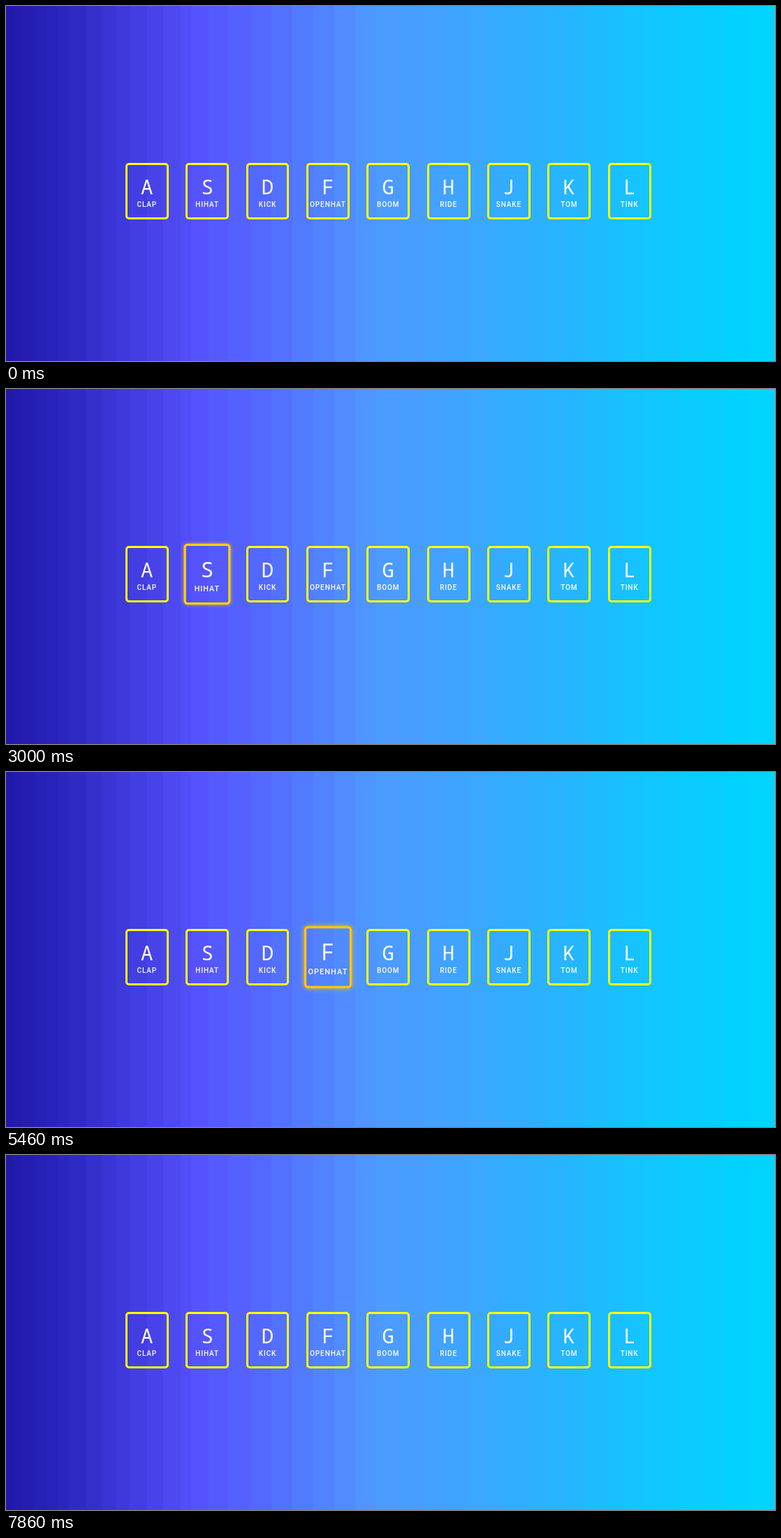
Recreate the animation shown at these times as an HTML page. Size 1101 by 509 pixels, loop 9200 ms.

```html
<!DOCTYPE html>
<html lang="en">
<head>
<meta charset="utf-8">
<title>Drum keys</title>
<style>
html, body { margin: 0; width: 100%; height: 100%; overflow: hidden; }
#stage { position: relative; width: 1101px; height: 509px; overflow: hidden; }
.key {
  position: absolute; top: 225px; width: 61.87px; height: 81px;
  box-sizing: border-box; border: 3px solid #ff0; border-radius: 5px;
  color: #fff; text-align: center;
}
.key kbd, .key span { position: absolute; left: -10px; right: -10px; white-space: nowrap; }
.key kbd { top: 16px; font: 29px/30px "Noto Sans Mono", monospace; }
.key span { top: 50.5px; font: 500 10px/12px Roboto, sans-serif; letter-spacing: .9px; }
#pointer { position: absolute; left: 0; top: 0; }
</style>
</head>
<body>
<div id="stage">
  <svg id="pointer" width="13" height="20"><path d="M.5 .5V16.5L4.3 13L7 19L9.5 18L6.8 12H12Z" fill="#fff" stroke="#000"/></svg>
</div>
<script>
const LOOP = 9200, RISE = 70;
const stage = document.getElementById('stage');
const pointer = document.getElementById('pointer');
const mix = (a, b, p) => a + (b - a) * p;
const clamp = v => Math.max(0, Math.min(1, v));

// Background: a smooth ramp sampled once per vertical band
const ramp = [
  [0, 32, 24, 170], [100, 47, 41, 196], [200, 68, 64, 228], [280, 86, 84, 255],
  [380, 83, 108, 255], [530, 78, 154, 255], [640, 64, 163, 255], [800, 38, 181, 255],
  [950, 14, 201, 255], [1060, 0, 211, 255], [1101, 0, 212, 255]
];
const edges = [0, 10, 22, 40, 58, 74, 90, 115, 138, 158, 177, 202, 225, 250, 265, 290, 318,
  350, 380, 410, 440, 470, 500, 530, 565, 600, 630, 660, 685, 712, 750, 775, 800, 830,
  860, 885, 910, 940, 965, 1000, 1030, 1060, 1101];

function rampColor(x) {
  const i = ramp.findIndex(stop => stop[0] >= x);
  const a = ramp[i - 1], b = ramp[i], p = (x - a[0]) / (b[0] - a[0]);
  return `rgb(${[1, 2, 3].map(c => Math.round(mix(a[c], b[c], p)))})`;
}
const bands = edges.slice(1).map((end, i) =>
  `${rampColor((edges[i] + end) / 2)} ${edges[i]}px ${end}px`);
stage.style.background = `linear-gradient(90deg, ${bands})`;

const labels = { A: 'CLAP', S: 'HIHAT', D: 'KICK', F: 'OPENHAT', G: 'BOOM',
  H: 'RIDE', J: 'SNAKE', K: 'TOM', L: 'TINK' };
const keys = Object.entries(labels).map(([letter, label], i) => {
  const el = document.createElement('div');
  el.className = 'key';
  el.style.left = 170.9 + 86.35 * i + 'px';
  el.innerHTML = `<kbd>${letter}</kbd><span>${label}</span>`;
  stage.insertBefore(el, pointer);
  return { el, letter };
});

const presses = [
  ['D', 245], ['S', 615], ['D', 945],
  ['F', 1345], ['D', 1498], ['S', 1622], ['A', 1740],
  ['D', 2045], ['F', 2675], ['D', 2800], ['S', 2920], ['D', 3455],
  ['K', 3720], ['L', 3850], ['K', 3980],
  ['D', 4375], ['F', 4560], ['H', 4740], ['K', 4920], ['L', 5100],
  ['D', 5315], ['F', 5390], ['G', 5530], ['J', 5670], ['K', 5810], ['L', 5955], ['H', 6100],
  ['S', 6275], ['D', 6585]
];

// The CSS "ease" curve, solved by bisection
function ease(x) {
  const bezier = (a, b, s) => 3 * a * s * (1 - s) ** 2 + 3 * b * s * s * (1 - s) + s ** 3;
  let lo = 0, hi = 1;
  for (let i = 0; i < 16; i++) {
    const mid = (lo + hi) / 2;
    if (bezier(.25, .25, mid) < x) lo = mid; else hi = mid;
  }
  return bezier(.1, 1, lo);
}

function pressLevel(letter, t) {
  const hit = presses.find(([k, at]) => k === letter && t > at && t < at + 2 * RISE);
  if (!hit) return 0;
  const p = (t - hit[1]) / RISE;
  return p < 1 ? ease(p) : 1 - ease(p - 1);
}

function draw(t) {
  for (const { el, letter } of keys) {
    const v = pressLevel(letter, t);
    el.style.transform = v ? `scale(${1 + .1 * v})` : 'none';
    el.style.borderColor = `rgb(255, ${mix(255, 198, v)}, 0)`;
    el.style.boxShadow = v ? `0 0 ${6.5 * v}px rgba(255, 198, 0, ${v})` : 'none';
  }
  // The pointer peeks in from the corner and leaves again
  const reach = Math.sin(Math.PI * clamp((t - 7470) / 390));
  pointer.style.visibility = reach > .001 ? 'visible' : 'hidden';
  pointer.style.transform = `translate(${mix(1101, 1059, reach)}px, ${mix(509, 486, reach)}px)`;
}

const start = performance.now();
function tick() {
  draw((performance.now() - start) % LOOP);
  requestAnimationFrame(tick);
}
tick();
</script>
</body>
</html>
```
